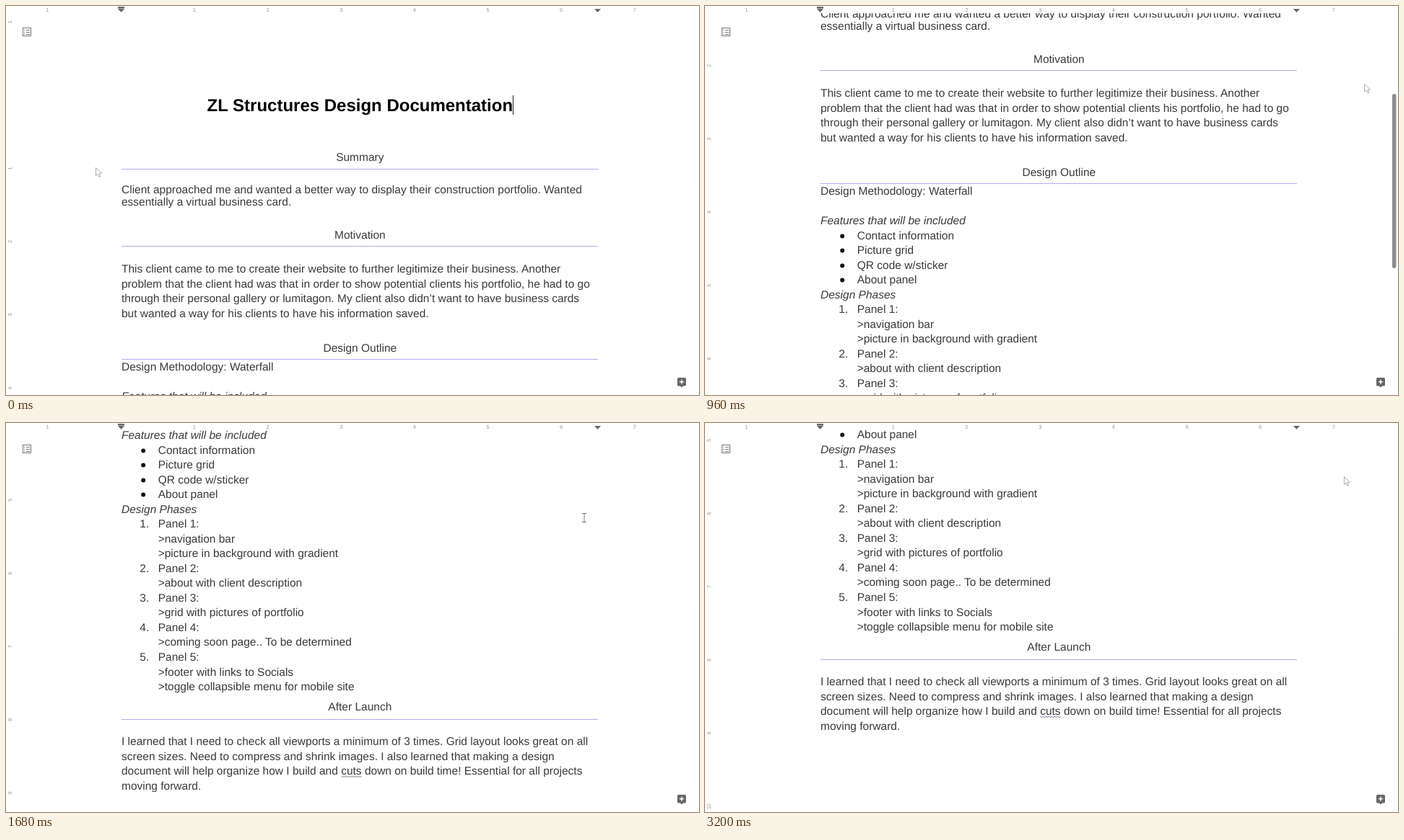
These frames come from a looping animation (960x540 px, 3280 ms). An HTML page with a canvas:

```html
<!DOCTYPE html>
<html lang="en">
<head>
<meta charset="utf-8">
<title>Design document</title>
<style>
html, body { margin: 0; width: 100%; height: 100%; overflow: hidden; background: #fff; }
canvas { display: block; width: 960px; height: 540px; }
</style>
</head>
<body>
<canvas id="stage" width="960" height="540"></canvas>
<script>
const ctx = document.getElementById('stage').getContext('2d');
const LOOP = 3280, STEP = 80;
const FONT = '"Liberation Sans", Arial, sans-serif';
const INK = '#3a3a3a', GREY = '#777', RULE = '#b4acf0';
const INCH = 101.65, ZERO = 159.3, LEFT = 160, RIGHT = 820, MID = 490.3;
const INDENT = 210.7, LINE = 20.53, TIGHT = 17.5;

const progress = (t, from, to) => Math.min(1, Math.max(0, (t - from) / (to - from)));
const smooth = (t, from, to) => {
  const u = progress(t, from, to);
  return u * u * (3 - 2 * u);
};
const settle = (t, from, to) => 1 - (1 - progress(t, from, to)) ** 1.46;

function scrollAt(t) {
  return Math.round(326 * smooth(t, 630, 1120) + 53 * smooth(t, 1200, 1440) + 229 * settle(t, 1440, 1920));
}

function mouseAt(t) {
  const toBar = smooth(t, 0, 640), toText = smooth(t, 880, 1120), drift = smooth(t, 1120, 1440);
  const down = smooth(t, 1440, 1920), away = smooth(t, 2080, 2640), back = smooth(t, 2640, 3000);
  return [
    124 + 835 * toBar - 177 * toText + 20 * drift - 2 * down + 126 * away - 41 * back,
    224 - 121 * toBar + 18 * toText + 21 * down - 53 * away - 15 * back
  ];
}

// Document layout at scroll 0; y is the baseline
const items = [], rules = [];
let y = 0;

const add = (text, x = LEFT, style = {}) => items.push({ text, x, y: Math.round(y), ...style });

function heading(text, at, gap) {
  y = at;
  add(text, MID, { align: 'center' });
  rules.push(at + gap);
}

function block(at, step, lines) {
  y = at;
  for (const line of lines) {
    add(line);
    y += step;
  }
}

y = 146;
add('ZL Structures Design Documentation', MID, { align: 'center', font: 'bold 24px', color: '#000' });
heading('Summary', 215, 11);
block(259.5, TIGHT, [
  'Client approached me and wanted a better way to display their construction portfolio. Wanted',
  'essentially a virtual business card.']);
heading('Motivation', 323, 10);
block(370, LINE, [
  'This client came to me to create their website to further legitimize their business. Another',
  'problem that the client had was that in order to show potential clients his portfolio, he had to go',
  'through their personal gallery or lumitagon. My client also didn’t want to have business cards',
  'but wanted a way for his clients to have his information saved.']);
heading('Design Outline', 480, 10);
block(506, LINE, ['Design Methodology: Waterfall', '']);

const italic = text => { add(text, LEFT, { font: 'italic 15.5px' }); y += LINE; };
const indented = text => { add(text, INDENT); y += LINE; };

italic('Features that will be included');
for (const feature of ['Contact information', 'Picture grid', 'QR code w/sticker', 'About panel']) {
  add('', 190.2, { bullet: true });
  indented(feature);
}
italic('Design Phases');
const panels = [
  ['navigation bar', 'picture in background with gradient'],
  ['about with client description'],
  ['grid with pictures of portfolio'],
  ['coming soon page.. To be determined'],
  ['footer with links to Socials', 'toggle collapsible menu for mobile site']
];
panels.forEach((notes, i) => {
  add(`${i + 1}.`, 185.3);
  indented(`Panel ${i + 1}:`);
  for (const note of notes) indented('>' + note);
});
heading('After Launch', 924, 12);
block(972, LINE, [
  'I learned that I need to check all viewports a minimum of 3 times. Grid layout looks great on all',
  'screen sizes. Need to compress and shrink images. I also learned that making a design',
  'document will help organize how I build and cuts down on build time! Essential for all projects',
  'moving forward.']);

function write(text, x, y, { font = '15.5px', color = INK, align = 'left' } = {}) {
  ctx.font = `${font} ${FONT}`;
  ctx.fillStyle = color;
  ctx.textAlign = align;
  ctx.fillText(text, x, y);
}

function poly(points, fill, stroke) {
  ctx.beginPath();
  for (const [x, y] of points) ctx.lineTo(x, y);
  if (fill) {
    ctx.closePath();
    ctx.fillStyle = fill;
    ctx.fill();
  }
  if (stroke) {
    ctx.strokeStyle = stroke;
    ctx.stroke();
  }
}

function box(x, y, w, h, r, color) {
  ctx.fillStyle = color;
  ctx.beginPath();
  ctx.roundRect(x, y, w, h, r);
  ctx.fill();
}

function drawPage(scroll, t) {
  ctx.save();
  ctx.beginPath();
  ctx.rect(0, 10, 960, 530);
  ctx.clip();
  ctx.translate(0, -scroll);
  for (const top of rules) box(LEFT, top, RIGHT - LEFT, 1, 0, RULE);
  for (const item of items) {
    if (item.bullet) box(item.x - 3, item.y - 7.5, 6, 6, 3, '#111');
    else write(item.text, item.x, item.y, item);
  }
  // Spelling mark under "cuts"
  ctx.lineWidth = 0.9;
  poly(Array.from({ length: 15 }, (_, i) => [464.5 + i * 2, 1015 + i % 2 * 2]), null, '#56658a');
  if (t < 480) box(702, 124, 1, 27, 0, '#222');
  ctx.restore();
}

function drawRulers(scroll) {
  const label = { font: '7.5px', color: '#999', align: 'center' };
  for (let i = -1; i < 11; i++) {
    if (!i) continue;
    const n = Math.abs(i), top = 123.7 + i * INCH - scroll;
    if (i < 8) write(n, ZERO + i * INCH, 7.5, label);
    if (top < 12) continue;
    ctx.save();
    ctx.translate(7.5, top);
    ctx.rotate(-Math.PI / 2);
    write(n, 0, 0, label);
    ctx.restore();
  }
  for (let i = -7; i < 61; i++) {
    const x = ZERO + i * INCH / 8;
    if (i % 8 && (i < 0 || x > RIGHT)) box(x, 4, 1, 1, 0, '#ececec');
  }
  box(155, 1, 9, 2.5, 0, '#666');
  for (const x of [159.5, 819.5]) poly([[x - 4.5, 4], [x + 4.5, 4], [x, 8.8]], '#666');
}

function drawIcons() {
  ctx.lineWidth = 1;
  ctx.strokeStyle = GREY;
  ctx.strokeRect(23.5, 30.5, 11, 11);
  for (let row = 33; row < 40; row += 3) {
    box(25, row, 1, 1, 0, GREY);
    box(28, row, 5, 1, 0, GREY);
  }
  box(930, 516, 12, 11.5, 1.5, '#666');
  poly([[933.5, 527], [938.5, 527], [936, 529.5]], '#666');
  poly(Array.from({ length: 8 }, (_, i) => {
    const r = i % 2 ? 1.5 : 4, a = i * Math.PI / 4;
    return [936 + r * Math.cos(a), 521.7 + r * Math.sin(a)];
  }), '#fff');
}

function drawMouse(x, y) {
  ctx.save();
  ctx.translate(x, y);
  ctx.lineWidth = 1;
  if (x > 155 && x < 835) {
    for (const s of [-6, 6]) poly([[-3, s], [3, s]], null, GREY);
    poly([[0, -6], [0, 6]], null, GREY);
  } else {
    const arrow = [[0.5, 0.5], [0.5, 11.5], [3, 9.2], [5, 13.3], [6.8, 12.5], [5, 8.6], [8.4, 8.3], [0.5, 0.5]];
    poly(arrow, '#fff', '#aaa');
  }
  ctx.restore();
}

function draw(now) {
  const t = Math.floor(now % LOOP / STEP) * STEP;
  const scroll = scrollAt(t);
  const hover = t >= 560 && t < 1040;
  box(0, 0, 960, 540, 0, '#fff');
  ctx.textRendering = 'geometricPrecision';
  drawPage(scroll, t);
  drawRulers(scroll);
  drawIcons();
  box(952, 5.5 + scroll * 0.477, 5.5, 242, 2.7, hover ? '#8b8d90' : '#fdfdfd');
  drawMouse(...mouseAt(t));
}

const start = performance.now();
function tick() {
  draw(performance.now() - start);
  requestAnimationFrame(tick);
}
tick();
</script>
</body>
</html>
```
